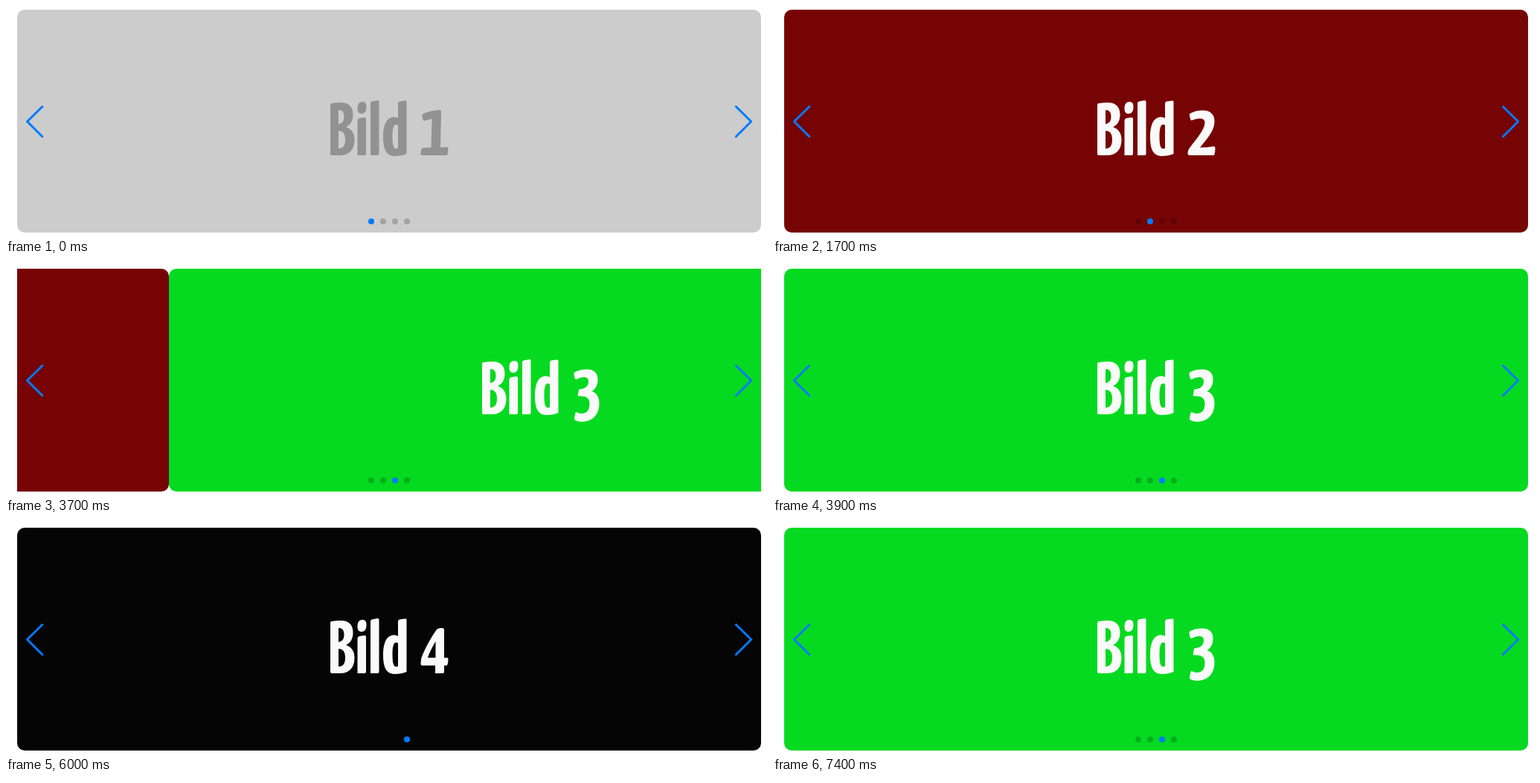
Recreate the animation shown at these times as an HTML page with a canvas. Size 1023 px wide and 311 px high, loop 8000 ms.

```html
<!DOCTYPE html>
<html lang="de">
<head>
<meta charset="utf-8">
<title>Bild-Slider</title>
<style>
  html, body { margin: 0; width: 100%; height: 100%; overflow: hidden; background: #fff; }
  canvas { display: block; width: 1023px; height: 311px; }
</style>
</head>
<body>
<canvas id="stage" role="img"></canvas>
<script>
const W = 1023, H = 311;
const LOOP = 8000, TICK = 100, DURATION = 300;
const VIEW = { x: 15, y: 5, w: 1000, h: 300, r: 10 };
const BLUE = '#007aff';

const slides = [
  { digit: '1', bg: '#cccccc', ink: '#929292' },
  { digit: '2', bg: '#770404', ink: '#fafafa' },
  { digit: '3', bg: '#05da20', ink: '#fafafa' },
  { digit: '4', bg: '#050505', ink: '#fafafa' }
];

// Start time of each transition and the slides it joins
const moves = [
  { at: 1400, from: 0, to: 1 },
  { at: 3552, from: 1, to: 2 },
  { at: 5652, from: 2, to: 3 },
  { at: 7052, from: 3, to: 2 }
];

// Condensed display lettering, placed for a centred slide
const word = [
  'M436 133Q436 131 438 131Q444 130 450 130C461 130 466.5 136 466.5 146C466.5 155 463 160 457 163C464 165 468.5 171 468.5 180C468.5 194 461 201 449 201H438Q436 201 436 199ZM447 140V159C452 158 454.5 155 454.5 149C454.5 143 452 140 447 140ZM447 168V192C453 192 456 188 456 180C456 172 453 168 447 168Z',
  'M472.5 138C472.5 132 475 129 479 129C483 129 484.5 131 484.5 136C484.5 142 482 145 478 145C474.5 145 472.5 143 472.5 138ZM472.5 154Q472.5 152 475 151L482 150Q484 150 484 152V199Q484 201 482 201H472.5Z',
  'M490 131Q490 129 492 128.5L499.5 127Q501.5 127 501.5 129V199Q501.5 201 499.5 201H490Z',
  'M527 131Q527 129 529 128.5L536.5 127.5Q538.5 127 538.5 129V199C534 201 529 202 523 202C512 202 507 194 507 177C507 159 512 149.5 522 149.5Q525 149.5 527 151ZM527 160.5Q526 159.5 524.5 159.5C521 159.5 519.5 165 519.5 176C519.5 187 521 192 524 192Q526 192 527 191.5Z'
].map(d => new Path2D(d));

const digits = {
  1: new Path2D('M559.5 148Q559 146 561 145C567 142 575 140.5 583 140Q585 140 585 142L584 190.5L592 190Q594.5 190 594.5 192Q594.5 197 593 201H559Q557 201 557.5 198Q558 192 560 191L571.5 190.5L572.5 152Q567 153 563 154.5Q561 155 560.5 153Z'),
  2: new Path2D('M560 148Q559 145 562 144C567 141.5 572 140.5 578 140.5C588 140.5 593.5 146 593.5 155C593.5 167 586 176 574 190.5Q584 190.5 592 189Q594.5 189 594.5 191Q594.5 197 593 201H560Q557.5 201 557.5 198Q557.5 194 560 191C570 178 580.5 166 580.5 157C580.5 153 578 151.5 573 151.5Q568 151.5 563 154Q561.5 154.5 561 152Z'),
  3: new Path2D('M559.5 147Q559 145 561 144C566 141.5 571 140.5 577 140.5C587 140.5 591.5 146 591.5 154C591.5 162 588.5 167 583.5 170C590 172 593.5 178 593.5 186C593.5 202 584 211 570 211Q565 211 561 209Q559.5 208 560 206L561.5 199Q562 197.5 564 198.5Q567 200 570 200C577 200 580.5 195 580.5 187C580.5 180 577 176.5 569 176.5H566Q564 176.5 565 174L566 168Q566 167 569 167C576 166 579 162 579 157C579 153 577 151 572.5 151Q568 151 563 154Q561 154.5 560.5 152Z'),
  4: new Path2D('M579 142Q581 140 585 140Q589 140 589 142V180H592.5Q594.5 180 594.5 182Q594.5 187 593 190.5H589V199Q589 201 587 201H577V190.5H559.5Q557.5 190.5 557.5 187Q557.5 181 560 176C565 164 572 152 579 142ZM577.5 158C573 166 569 173 567 180H577.5Z')
};

const canvas = document.getElementById('stage');
const ctx = canvas.getContext('2d');
const ratio = window.devicePixelRatio || 1;
canvas.width = Math.round(W * ratio);
canvas.height = Math.round(H * ratio);
ctx.scale(ratio, ratio);

// CSS "ease": cubic-bezier(.25, .1, .25, 1)
function ease(x) {
  if (x <= 0) return 0;
  if (x >= 1) return 1;
  const bezier = (a, b, s) => 3 * a * s * (1 - s) ** 2 + 3 * b * s * s * (1 - s) + s ** 3;
  let lo = 0, hi = 1;
  for (let i = 0; i < 30; i++) {
    const mid = (lo + hi) / 2;
    if (bezier(0.25, 0.25, mid) < x) lo = mid; else hi = mid;
  }
  return bezier(0.1, 1, lo);
}

function stateAt(time) {
  let position = 0, active = 0;
  for (const { at, from, to } of moves) {
    if (time <= at) break;
    position = from + (to - from) * ease((time - at) / DURATION);
    active = to;
  }
  // The first move is picked up one tick after it starts
  return { position, active };
}

function drawSlide({ digit, bg, ink }, shift) {
  ctx.save();
  ctx.translate(shift, 0);
  ctx.fillStyle = bg;
  ctx.beginPath();
  ctx.roundRect(VIEW.x, VIEW.y, VIEW.w, VIEW.h, VIEW.r);
  ctx.fill();
  ctx.fillStyle = ink;
  for (const glyph of [...word, digits[digit]]) ctx.fill(glyph, 'evenodd');
  ctx.restore();
}

function drawArrow(tip, tail) {
  ctx.beginPath();
  ctx.moveTo(tail, 135.5);
  ctx.lineTo(tip, 155.5);
  ctx.lineTo(tail, 175.8);
  ctx.stroke();
}

function drawControls(active) {
  ctx.strokeStyle = BLUE;
  ctx.lineWidth = 3;
  ctx.lineCap = ctx.lineJoin = 'round';
  drawArrow(28.5, 48.8);
  drawArrow(1001.7, 981.4);
  slides.forEach((_, i) => {
    ctx.fillStyle = i === active ? BLUE : 'rgba(0, 0, 0, 0.2)';
    ctx.beginPath();
    ctx.arc(491 + 16 * i, 290, 4, 0, Math.PI * 2);
    ctx.fill();
  });
}

function render(time) {
  const { position, active } = stateAt(time);
  ctx.fillStyle = '#fff';
  ctx.fillRect(0, 0, W, H);
  ctx.save();
  ctx.beginPath();
  ctx.rect(VIEW.x, VIEW.y, VIEW.w, VIEW.h);
  ctx.clip();
  slides.forEach((slide, i) => {
    const shift = Math.round((i - position) * VIEW.w);
    if (Math.abs(shift) < VIEW.w) drawSlide(slide, shift);
  });
  drawControls(active);
  ctx.restore();
  canvas.setAttribute('aria-label', 'Bild ' + slides[active].digit);
}

const start = performance.now();
function frame() {
  const time = (performance.now() - start) % LOOP;
  render(Math.floor(time / TICK) * TICK);
  requestAnimationFrame(frame);
}
frame();
</script>
</body>
</html>
```
